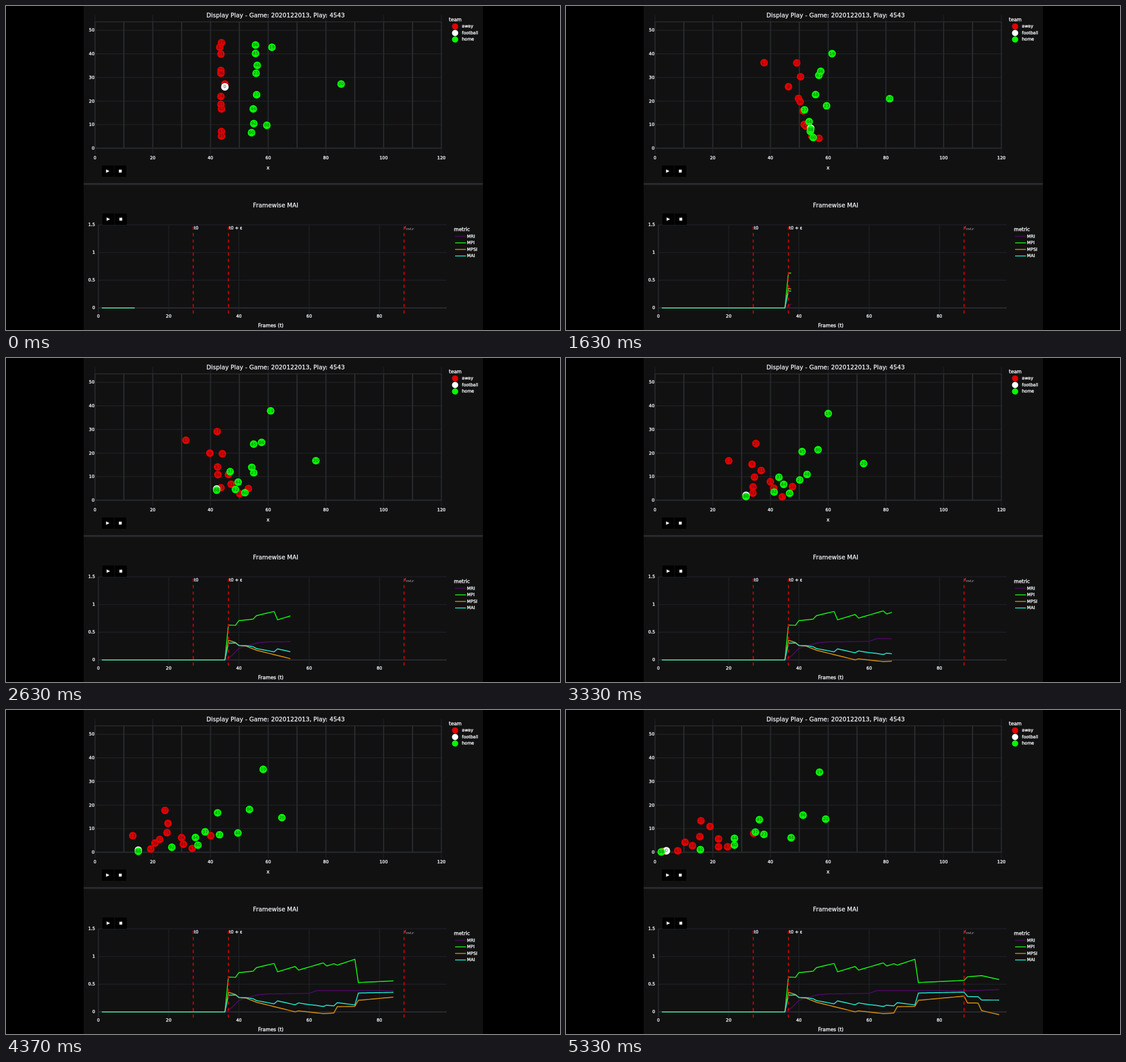
An HTML page with a canvas for the animation above (5.73 s loop, 977 px wide and 573 px high).

```html
<!DOCTYPE html>
<html lang="en">
<head>
<meta charset="utf-8">
<title>Play and metrics</title>
<style>
  html, body { margin: 0; width: 100%; height: 100%; overflow: hidden; background: #000; }
  canvas { display: block; width: 977px; height: 573px; }
</style>
</head>
<body>
<canvas id="stage"></canvas>
<script>
const W = 977, H = 573, LOOP = 5730;
const FIRST = 10.3, LAST = 97, RATE = 0.01686, KICK = 36, CATCH = 25.5;
const FONT = '"DejaVu Sans", sans-serif';
const RED = '#e10202', GREEN = '#06fb06', WHITE = '#fff', INK = '#f2f5fa', PANEL = '#111';
const GRID = '#23272f', FIELD = '#2b2d31';

const canvas = document.getElementById('stage');
const ratio = window.devicePixelRatio || 1;
canvas.width = W * ratio;
canvas.height = H * ratio;
const ctx = canvas.getContext('2d');
ctx.scale(ratio, ratio);

const clamp01 = v => Math.max(0, Math.min(1, v));
const lerp = (a, b, u) => a + (b - a) * u;
const parsePairs = text => text.split(' ').map(pair => pair.split(',').map(Number));
const frameX = f => 163 + f * 6.195;
const valueY = v => 534 - v * 98;
const fieldX = x => 157 + x * 5.09;
const fieldY = y => 251.5 - y * 4.17;

// A smooth run through evenly timed waypoints, starting from rest.
function run(route) {
  const points = parsePairs(route), last = points.length - 1;
  const slope = (i, axis) => {
    if (i === 0) return 0;
    const next = Math.min(i + 1, last);
    return (points[next][axis] - points[i - 1][axis]) / (next - i + 1);
  };
  return frame => {
    const p = clamp01((frame - FIRST) / (LAST - FIRST)) * last;
    const i = Math.min(Math.floor(p), last - 1), u = p - i, ease = u * u * (3 - 2 * u);
    return [0, 1].map(axis => lerp(points[i][axis], points[i + 1][axis], ease) +
      u * (1 - u) * ((1 - u) * slope(i, axis) - u * slope(i + 1, axis)));
  };
}

// The ball flies to its catcher, is carried, and slips loose at the very end.
const carrier = run('460,211 428,219 310,246 168,251');
function ball(frame) {
  const flight = clamp01((frame - FIRST) / (CATCH - FIRST));
  const loose = clamp01((frame - 86) / (LAST - 86));
  const [x, y] = carrier(Math.max(frame, CATCH));
  return [lerp(386, x + loose * 9, flight), lerp(143, y - 2, flight)];
}

const away = (label, route) => ({ color: RED, ink: '#5c0d0d', label, path: run(route) });
const home = (label, path) => ({ color: GREEN, ink: '#175c17', label, path });

const movers = [
  away(27, '380,65 406,103 330,154 238,196'),
  away(12, '377,73 347,103 282,186 171,250'),
  away(31, '379,85 413,128 339,202 236,224'),
  away(33, '379,114 409,166 327,213 223,240'),
  away(36, '379,119 412,172 324,230 210,234'),
  away(9, '386,138 391,144 324,190 254,206'),
  away(24, '379,160 418,187 356,220 269,228'),
  away(41, '379,174 420,211 362,231 269,242'),
  away(43, '380,182 422,214 323,240 197,249'),
  away(47, '380,222 434,231 377,246 285,242'),
  away(35, '380,230 447,234 396,227 331,218'),
  { color: WHITE, ink: '#444', label: 0, path: ball },
  home(19, run('469,73 467,93 447,110')),
  home(20, run('591,138 548,181 458,193')),
  home(23, run('441,119 459,179 409,217 349,220')),
  home(37, run('442,157 419,185 373,212 334,216')),
  home(92, run('437,208 407,232 237,247')),
  home(44, run('436,182 411,219 297,227')),
  home(45, run('440,84 438,151 341,194')),
  home(48, run('443,105 434,192 397,226')),
  home(88, carrier),
  home(60, run('433,224 423,238 297,239')),
  home(86, run('440,69 451,148 418,186'))
];

// Straight pieces between the turning points of a metric.
function curve(turns) {
  const points = parsePairs(`0,0 ${KICK},0 ${turns}`);
  return f => {
    const i = Math.max(1, points.findIndex(p => p[0] >= f));
    const [f0, v0] = points[i - 1], [f1, v1] = points[i];
    return lerp(v0, v1, (f - f0) / (f1 - f0));
  };
}

const mri = curve('38,.08 40,.21 45,.305 48,.325 60,.335 62,.383 89,.383 97,.405');
const mpi = curve('37,.63 39,.625 40,.71 44,.735 45,.8 50,.875 51,.725 56,.82 57,.755 64,.885 65,.83 67,.87 68,.845 73,.95 74,.53 87,.57 88,.635 92,.655 97,.585');
const mpsi = curve('37,.355 39,.315 40,.26 42,.25 45,.175 56,.002 57,.02 64,-.03 67,-.02 68,.095 73,.1 74,.21 87,.285 88,.163 91,.16 92,.025 97,-.05');
const mai = f => f <= KICK ? 0 : 0.17 * mri(f) + 0.4 * (1 - mpi(f)) + 0.42 * mpsi(f);

const metrics = [
  { name: 'MRI', color: '#4d0961', value: mri },
  { name: 'MPI', color: '#12ee12', value: mpi },
  { name: 'MPSI', color: '#d18a0b', value: mpsi },
  { name: 'MAI', color: '#20e0c8', value: mai }
];

function line(x1, y1, x2, y2, color, width = 1, dash = []) {
  ctx.strokeStyle = color;
  ctx.lineWidth = width;
  ctx.setLineDash(dash);
  ctx.beginPath();
  ctx.moveTo(x1, y1);
  ctx.lineTo(x2, y2);
  ctx.stroke();
  ctx.setLineDash([]);
}

function rect(x, y, w, h, color) {
  ctx.fillStyle = color;
  ctx.fillRect(x, y, w, h);
}

function disc(x, y, r, color) {
  ctx.fillStyle = color;
  ctx.beginPath();
  ctx.arc(x, y, r, 0, Math.PI * 2);
  ctx.fill();
}

function text(str, x, y, size = 7.6, align = 'left', color = INK, weight = 0.4) {
  ctx.font = `${size}px ${FONT}`;
  ctx.textAlign = align;
  ctx.textBaseline = 'middle';
  ctx.fillStyle = ctx.strokeStyle = color;
  ctx.lineWidth = weight;
  ctx.fillText(str, x, y);
  if (weight) ctx.strokeText(str, x, y);
}

function buttons(x, y) {
  rect(x, y, 21, 20, '#000');
  rect(x + 22, y, 21, 20, '#000');
  ctx.fillStyle = WHITE;
  ctx.beginPath();
  ctx.moveTo(x + 7.5, y + 7);
  ctx.lineTo(x + 13.5, y + 10);
  ctx.lineTo(x + 7.5, y + 13);
  ctx.fill();
  rect(x + 30, y + 7.5, 5, 5, WHITE);
}

function drawField() {
  for (let y = 0; y <= 50; y += 10) {
    line(157, fieldY(y), 768, fieldY(y), y ? GRID : FIELD, y ? 1 : 2);
    text(y, 156, fieldY(y) + 0.5, 7.6, 'right');
  }
  for (let x = 0; x <= 120; x += 10) {
    const px = fieldX(x);
    line(px, 28, px, 252, FIELD, 2);
    if (x % 20 === 0) {
      line(px, 16, px, 262, GRID);
      text(x, px, 269, 7.6, 'center');
    }
  }
  line(157, 28, 768, 28, FIELD, 1.5);
  text('Display Play - Game: 2020122013, Play: 4543', 475.5, 17, 10.65, 'center', INK, 0.3);
  text('x', 462, 286.5, 8.8, 'center');
  text('team', 781, 24.5, 8.7);
  [['away', RED], ['football', WHITE], ['home', GREEN]].forEach(([name, color], i) => {
    disc(792, 36.2 + i * 11.5, 5.5, color);
    text(name, 804, 36.5 + i * 11.5);
  });
  buttons(169, 282);
}

function drawChart() {
  for (let v = 0; v <= 1.5; v += 0.5) {
    line(163, valueY(v), 777, valueY(v), v ? GRID : FIELD, v ? 1 : 2);
    text(v, 157, valueY(v), 7.6, 'right');
  }
  for (let f = 0; f <= 80; f += 20) {
    line(frameX(f), 387, frameX(f), 543, f ? GRID : FIELD, f ? 1 : 1.5);
    text(f, frameX(f), 549, 7.6, 'center');
  }
  text('Framewise MAI', 475.5, 353, 10.65, 'center', INK, 0.3);
  text('Frames (t)', 467, 565.5, 8.8, 'center');
  text('metric', 790, 396, 8.7);
  metrics.forEach(({ name, color }, i) => {
    const y = 407.3 + i * 11.6;
    line(792, y, 811, y, color, 1.6);
    text(name, 813, y + 0.3);
  });
  buttons(170, 367);
}

function drawMarks() {
  for (const f of [27, 37, 87]) line(frameX(f), 544, frameX(f), 387, '#d00000', 1.9, [5.7, 5.7]);
  text('t0', 331.5, 393);
  text('t0 + ε', 393.5, 393);
  ctx.fillStyle = '#bbb';
  ctx.font = 'italic 8px "Liberation Serif", serif';
  ctx.fillText('t', 703, 392);
  ctx.font = 'italic 6px "Liberation Serif", serif';
  ctx.fillText('end,σ', 705.5, 394);
}

function drawMetric({ color, value }, head) {
  ctx.strokeStyle = color;
  ctx.lineWidth = 1.7;
  ctx.lineJoin = 'round';
  ctx.beginPath();
  for (let f = 1; f < head; f++) ctx.lineTo(frameX(f), valueY(value(f)));
  ctx.lineTo(frameX(head), valueY(value(head)));
  ctx.stroke();
}

function drawMover({ color, ink, label, path }, head) {
  const [x, y] = path(head);
  disc(x, y, 6.7, color);
  text(label, x, y + 0.4, 7.6, 'center', ink, 0);
}

// Thirty steps a second, on a 10 ms clock: 0, 30, 70, 100, ...
function stepTime(ms) {
  const rest = ms % 100;
  return ms - rest + (rest < 30 ? 0 : rest < 70 ? 30 : 70);
}

function draw(t) {
  const head = Math.min(LAST, FIRST + RATE * t);
  rect(0, 0, W, H, '#000');
  rect(137, 0, 704, H, PANEL);
  rect(137, 313, 704, 3.5, '#29292f');
  drawField();
  drawChart();
  for (const metric of metrics) drawMetric(metric, head);
  drawMarks();
  for (const mover of movers) drawMover(mover, head);
}

const start = performance.now();
function tick() {
  draw(stepTime((performance.now() - start) % LOOP));
  requestAnimationFrame(tick);
}
tick();
</script>
</body>
</html>
```
